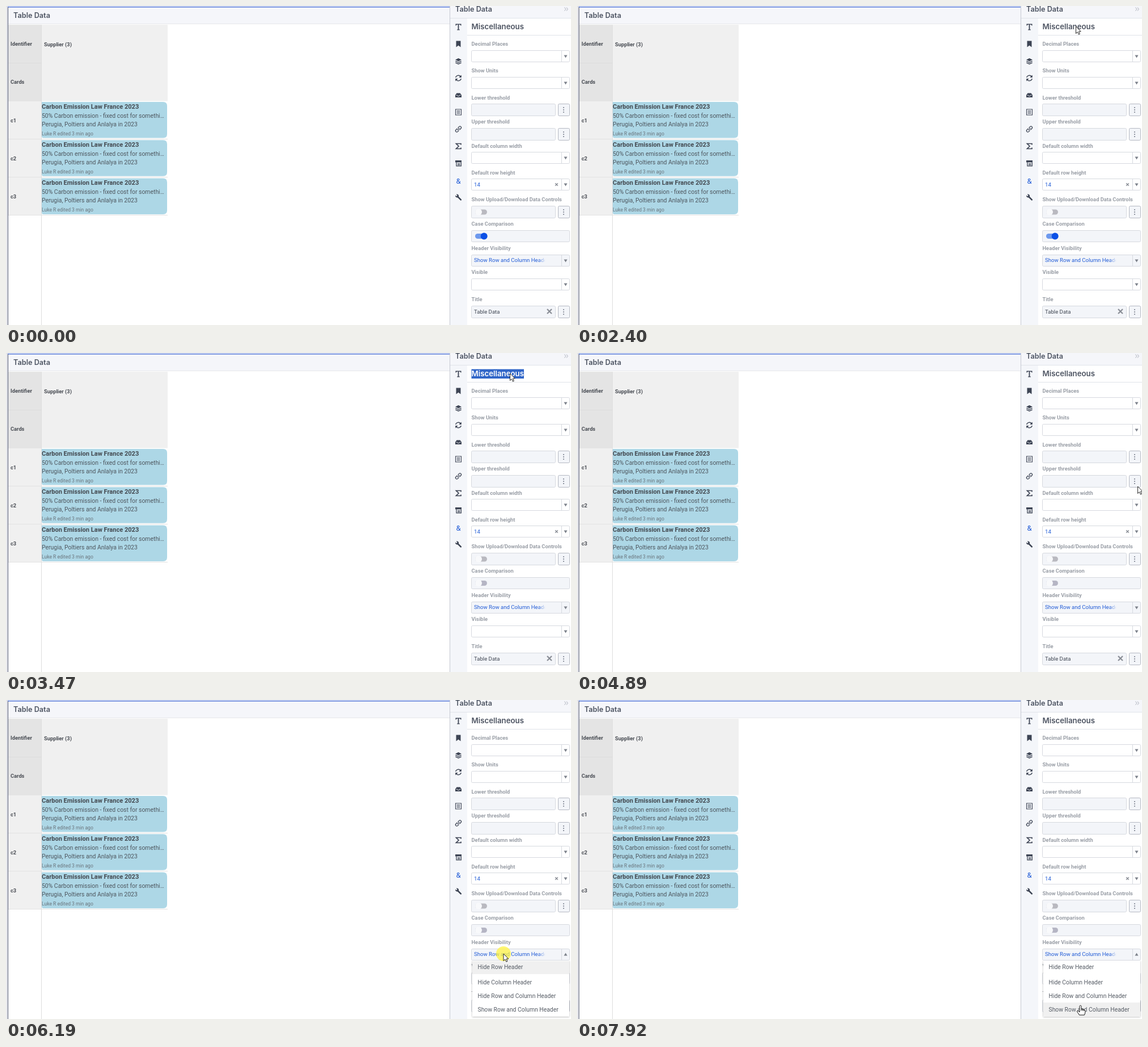
Write an HTML page that moves like this. It is 996x562 px and loops after 7990 ms.

```html
<!DOCTYPE html>
<html lang="en">
<head>
<meta charset="utf-8">
<title>Table settings</title>
<style>
html, body { margin: 0; width: 100%; height: 100%; overflow: hidden; background: #fff; }
svg { display: block; }
text { font-family: Roboto, sans-serif; white-space: pre; }
.title { font-family: Inter, sans-serif; font-weight: 600; fill: #4d5462; }
.label { font-size: 9.35px; font-weight: 700; fill: #9a9fa7; }
.head { font-size: 9.3px; font-weight: 700; fill: #484c53; }
.value { font-size: 9.6px; }
.item { font-size: 10.36px; fill: #565c65; }
.icon { fill: none; stroke: #3d4454; stroke-width: 1.3; }
.solid { fill: #3d4454; }
</style>
</head>
<body>
<svg id="stage" width="996" height="562" viewBox="0 0 996 562"></svg>
<script>
const LOOP = 7990, TICK = 1000 / 15;
const BLUE = '#1f5ad6', FIELD = '#f3f5f9', BORDER = '#d6d9df';

const rect = (x, y, w, h, fill, more = '') =>
  `<rect x="${x}" y="${y}" width="${w}" height="${h}" fill="${fill}" ${more}/>`;
const text = (x, y, s, cls, more = '') =>
  `<text x="${x}" y="${y}" class="${cls}" ${more}>${s}</text>`;
const path = (d, cls, more = '') => `<path d="${d}" class="${cls}" ${more}/>`;
const box = (x, y, w, h, fill, stroke = BORDER) =>
  rect(x + .5, y + .5, w - 1, h - 1, fill, `stroke="${stroke}" rx="2"`);

function card(y) {
  return path(`M63 ${y}H277Q284 ${y} 284 ${y + 7}V${y + 56.5}Q284 ${y + 63.5} 277 ${y + 63.5}H66Q63 ${y + 63.5} 63 ${y + 60}Z`, '', 'fill="#add7e6"') +
    text(63, y + 12, 'Carbon Emission Law France 2023', '', 'font-size="11.05" font-weight="700" fill="#434950"') +
    text(63, y + 28, '50% Carbon emission - fixed cost for somethi…', '', 'font-size="10.4" fill="#4e565e"') +
    text(63, y + 43, 'Perugia, Poltiers and Anlalya in 2023', '', 'font-size="10.45" fill="#4e565e"') +
    text(63, y + 58.5, 'Luke R edited 3 min ago', '', 'font-size="8.55" fill="#6a747c"');
}

function table() {
  let s = rect(0, 0, 4, 562, '#e3e4e9') + rect(4, 2, 778, 30, '#f5f6fa') +
    rect(3, 1, 779, 1.5, '#5478d8') + rect(3, 2, 1, 560, '#5a6076') +
    rect(4, 31, 778, 1, '#e6e7eb') +
    text(13, 21, 'Table Data', 'title', 'font-size="12.7"') +
    rect(4, 33, 58, 135, '#e4e4e4') + rect(4, 100, 58, 1, '#dcdcdc') +
    rect(63, 33, 222, 134.5, '#f0f0f0') + rect(4, 168, 58, 201, '#f0f0f0') +
    rect(62, 33, 1, 529, '#dedede') +
    text(8, 69.5, 'Identifier', 'head') + text(67, 70.5, 'Supplier (3)', 'head') +
    text(8, 136.5, 'Cards', 'head');
  for (let i = 0; i < 3; i++) {
    const y = 169 + i * 67.2;
    s += rect(4, Math.round(y + 65), 281, 1, '#e2e2e2') + card(y) +
      text(8, y + 36, 'c' + (i + 1), 'head');
  }
  return s;
}

const down = (y, id = '') => path(`M983.5 ${y - 2}H989.5L986.5 ${y + 3}Z`, '', `fill="#7d828b" ${id}`);

function select(y, fill, id) {
  return box(820, y, 174, 21, fill) + rect(979, y + 1, 1, 19, BORDER) + down(y + 10.5, id);
}

function menuField(y) {
  const dots = [-4, 0, 4].map(d => rect(982, y + 10 + d, 2, 2, '#9095a0')).join('');
  return box(820, y, 149, 22, FIELD) + box(973, y, 21, 22, FIELD, '#b4b8c2') + dots;
}

const toggle = (y, id) =>
  `<g id="${id}">` + rect(827, y - 4.5, 21, 9, '#b9b9c0', 'rx="4.5"') +
  `<circle cx="833" cy="${y}" r="6" fill="#f8f9fb"/></g>`;

const cross = (x, y, r, w) =>
  path(`M${x - r} ${y - r}L${x + r} ${y + r}M${x + r} ${y - r}L${x - r} ${y + r}`, '', `fill="none" stroke="#8b8f97" stroke-width="${w}"`);

function icons() {
  const at = (y, s) => `<g transform="translate(797.5 ${y})">${s}</g>`;
  return at(37, path('M-5-5.5H5V-2.5H4Q3.7-4.2 2-4.2H.9V4.3H2.3V5.5H-2.3V4.3H-.9V-4.2H-2Q-3.7-4.2-4-2.5H-5Z', 'solid')) +
    at(67, path('M-4-5.5H4V5.5L0 2.5L-4 5.5Z', 'solid')) +
    at(97, path('M0-5L5.5-2.3L0 .4L-5.5-2.3Z', 'solid') + path('M-5.2 .2L0 2.6L5.2 .2M-5.2 2.8L0 5.2L5.2 2.8', 'icon')) +
    at(127, path('M-4.8-1A5 5 0 0 1 4-2.8M4.8 1A5 5 0 0 1-4 2.8', 'icon') + path('M5.3-5.5V-1H.8ZM-5.3 5.5V1H-.8Z', 'solid')) +
    at(157, path('M-5.5 0L-3-3.5H3L5.5 0V4H-5.5Z', 'solid') + path('M-4 .3H-2L-1.2 1.7H1.2L2 .3H4', '', 'fill="none" stroke="#dfe3ea"')) +
    at(187, path('M-5-5H5V5H-5ZM-3-2.3H3M-3 0H3M-3 2.3H3', 'icon', 'style="stroke-width:1.1"')) +
    at(217, `<g transform="rotate(-45)">${path('M-.5-2.2H-4A2.2 2.2 0 0 0-4 2.2H-1M.5 2.2H4A2.2 2.2 0 0 0 4-2.2H1M-2.4 0H2.4', 'icon')}</g>`) +
    at(247, path('M4.5-2.5V-4.5H-4L.5 0L-4 4.5H4.5V2.5', 'icon', 'style="stroke-width:1.7"')) +
    at(277, path('M-5.5-5H5.5V-1.5H-5.5Z', 'solid') + path('M-3.5-1.5V4.8H4.8V-1.5M-1.5 .8H3M-1.5 2.8H3', 'icon')) +
    at(308, text(0, 4.5, '&amp;', '', `font-size="13" text-anchor="middle" fill="${BLUE}"`)) +
    at(337, path('M-1.2-1.2L4.3 4.3', '', 'stroke="#3d4454" stroke-width="2.6" stroke-linecap="round"') +
      path('M-5.3-3.6L-3.3-1.8L-1.9-3.2L-3.8-5.2Q-.6-6 .6-3.3Q1.2-.8-.6 .2Q-3 1.2-4.8-.8Q-5.7-2-5.3-3.6Z', 'solid'));
}

function panel() {
  const labels = [['Decimal Places', 67], ['Show Units', 114], ['Lower threshold', 161.5],
    ['Upper threshold', 204], ['Default column width', 247], ['Default row height', 294],
    ['Show Upload/Download Data Controls', 341], ['Case Comparison', 384],
    ['Header Visibility', 426.5], ['Visible', 469], ['Title', 516.5]];
  return rect(782, 0, 214, 562, '#fff') + rect(783, 0, 213, 21, '#f5f6fa') +
    rect(783, 21, 30, 541, '#f4f6fa') + rect(783, 21, 213, 1, '#e1e4ea') +
    rect(782, 0, 1, 562, '#c6c9d2') +
    text(792, 10, 'Table Data', 'title', 'font-size="12.7"') +
    path('M984.5 2.5L987 5.5L984.5 8.5M988 2.5L990.5 5.5L988 8.5', '', 'fill="none" stroke="#a6abb6"') +
    icons() + rect(813, 51, 183, 1, '#dfe2e8') +
    rect(820.5, 28.5, 92.5, 16.5, '#3166c8', 'id="mark"') +
    text(820.5, 41, 'Miscellaneous', 'title', 'id="heading" font-size="13.25"') +
    labels.map(([s, y]) => text(820.5, y + 3.3, s, 'label')).join('') +
    select(78, '#fff') + select(125, '#fff') + menuField(172) + menuField(215) +
    select(257, '#fff') + select(304, '#fff') + menuField(352) +
    text(825, 318.3, '14', 'value', `fill="${BLUE}"`) + cross(970.5, 314.5, 2.3, 1.5) +
    toggle(363, 'upload') + box(820, 395, 174, 21, FIELD) + toggle(405.5, 'compare') +
    select(438, FIELD, 'id="caret"') +
    text(825, 451.4, 'Show Row and Column Header', 'value', `fill="${BLUE}"`) +
    rect(939, 440, 12, 17, 'url(#fade)') + rect(950, 440, 28.5, 17, FIELD) +
    select(480, '#fff') + menuField(528) +
    text(825, 542, 'Table Data', 'value', 'fill="#3e4551"') + cross(958, 538, 4, 2.3);
}

const ROWS = [[460, 23, 474.4], [486, 23, 501.2], [509, 24, 524.9], [533, 24, 548.7]];

function popup() {
  const names = ['Hide Row Header', 'Hide Column Header', 'Hide Row and Column Header', 'Show Row and Column Header'];
  return `<g clip-path="url(#drop)"><g id="popup">` +
    rect(822, 459, 171, 98.5, '#fff', 'filter="url(#shadow)"') +
    rect(822, 460, 171, 23, '#f0f0f0', 'id="hover"') +
    names.map((s, i) => text(831.5, ROWS[i][2], s, 'item')).join('') + '</g></g>';
}

const stage = document.getElementById('stage');
stage.innerHTML = `<defs>
  <linearGradient id="fade"><stop stop-color="${FIELD}" stop-opacity="0"/><stop offset="1" stop-color="${FIELD}"/></linearGradient>
  <filter id="shadow" x="-5%" y="-5%" width="110%" height="115%"><feDropShadow dx="0" dy="1" stdDeviation="1.5" flood-color="#000" flood-opacity=".3"/></filter>
  <clipPath id="drop"><rect x="816" y="459" width="180" height="103"/></clipPath>
</defs>` + table() + panel() + popup() +
  '<circle id="click" r="13" fill="#fff23c" opacity=".72"/>' +
  path('M0 0V12.5L2.9 9.8L4.9 14.2L6.9 13.3L5 9H8.8Z', '', 'id="arrow" fill="#fff" stroke="#111" stroke-width=".9"') +
  path('M-2 1.6C-2-.4 1-.4 1 1.6V6.5L5.6 7.4Q8 8 8 10.5Q8 14 6.4 17H-2.5Q-4 14-6.4 11.4Q-7 9-4.6 9.7L-2 11.8ZM1 6.5V9.5M3.4 7V9.7M5.7 7.5V10', '', 'id="hand" fill="#fff" stroke="#111"');

const $ = id => document.getElementById(id);
const set = (id, attrs) => { for (const k in attrs) $(id).setAttribute(k, attrs[k]); };
const show = (id, on) => set(id, { visibility: on ? 'visible' : 'hidden' });
const clamp = v => Math.max(0, Math.min(1, v));

// Pointer path: tick, x, y. Below zero means off the stage.
const KEYS = [[0, 0, -50], [13, 0, -50], [14, 906, 556], [19, 886.5, 479], [22, 951, 345],
  [25, 926, 213], [26, 0, -50], [29, 0, -50], [30, 898, 55], [33, 891, 7], [36, 879.5, 36],
  [49, 879.5, 36], [52, 888.5, 36], [55, 738, 2], [59, 984, 39], [65, 984, 39], [73, 988.5, 235],
  [74, 987, 239], [80, 946, 345], [84, 869, 457], [86, 877, 447], [94, 877, 447], [98, 871, 474],
  [103, 896, 507], [107, 890.5, 536], [108, 890.5, 539], [111, 892, 554], [112, 0, -50],
  [117, 0, -50], [118, 890, 547], [119, 888, 538], [130, 888, 538]];

function pointer(n) {
  const i = KEYS.findIndex(k => k[0] > n), [a, b] = [KEYS[i - 1], KEYS[i]];
  const p = (n - a[0]) / (b[0] - a[0]);
  return [a[1] + (b[1] - a[1]) * p, a[2] + (b[2] - a[2]) * p];
}

function draw(t) {
  const n = Math.floor((t + 25) / TICK);
  const [x, y] = pointer(n);
  const hand = (n > 17 && n < 21) || (n > 94 && y > 459);
  for (const id of ['arrow', 'hand']) {
    show(id, y > -20 && (id === 'hand') === hand);
    set(id, { transform: `translate(${x} ${y})` });
  }
  show('click', (n >= 40 && n < 45) || (n >= 62 && n < 65) || (n >= 87 && n < 95));
  set('click', { cx: x, cy: y });

  const marked = n >= 42 && n < 62;
  show('mark', marked);
  $('heading').style.fill = marked ? '#fff' : '';

  const on = 1 - clamp((n - 42) / 2);
  const [track, knob] = $('compare').children;
  track.setAttribute('fill', on > .4 ? '#6d99ee' : '#b5b5c4');
  knob.setAttribute('fill', on > .4 ? '#0b50e6' : '#f8f9fb');
  knob.setAttribute('cx', 833 + 9.7 * on);

  const open = clamp((n - 88) / 4);
  show('popup', open > 0);
  show('hover', open > 0);
  set('popup', { transform: `translate(0 ${-104 * (1 - open) ** 2})` });
  set('caret', { transform: open > 0 ? 'rotate(180 986.5 448.5)' : '' });
  const row = n >= 107 || y >= 533 ? 3 : n < 95 || y < 485 ? 0 : y < 509 ? 1 : 2;
  set('hover', { y: ROWS[row][0], height: ROWS[row][1] });
}

const start = performance.now();
function loop() {
  draw((performance.now() - start) % LOOP);
  requestAnimationFrame(loop);
}
loop();
</script>
</body>
</html>
```
